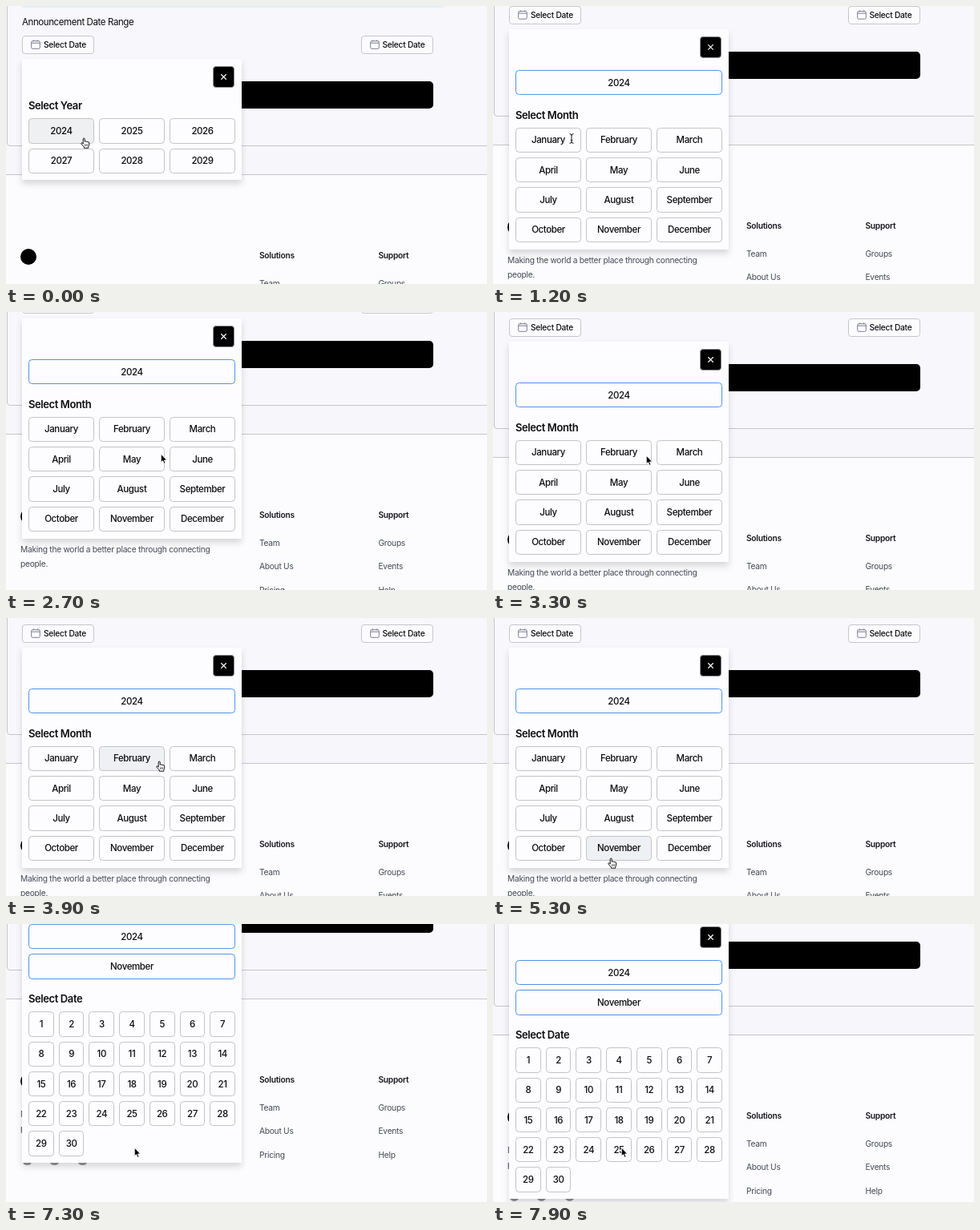
An HTML page that plays this animation: 600x347 px, repeating every 8 s.

```html
<!DOCTYPE html>
<html lang="en">
<head>
<meta charset="utf-8">
<title>Date range picker</title>
<style>
html, body { margin: 0; width: 100%; height: 100%; overflow: hidden; }
body { position: relative; background: #fcfbfe; color: #0c0c0f; font: 11.5px/16px Inter, Roboto, sans-serif; letter-spacing: -.035em; }
div, svg { box-sizing: border-box; }
#stage { position: absolute; left: 0; top: 0; width: 600px; height: 347px; overflow: hidden; }
#page { position: absolute; left: 0; top: 0; width: 600px; height: 600px; animation: scroll 8s linear infinite; }
#page > *, .view > * { position: absolute; }

.section { left: 0; top: 0; width: 600px; height: 211px; background: #f7f6fa; border-bottom: 1px solid #c6c5cc; }
.panel { left: 1px; top: -20px; width: 640px; height: 195px; background: #f8f7fb; border: 1px solid #c6c5cc; border-radius: 4px; }
.band { left: 20px; top: 0; width: 527px; height: 2px; background: #e2effc; }
.bar { left: 20px; top: 94px; width: 513px; height: 34px; border-radius: 5px; background: #000; }
.pick { top: 37px; width: 90px; height: 22.5px; padding-left: 10px; display: flex; align-items: center; gap: 4px;
  border: 1px solid #c6c6cd; border-radius: 4px; background: #fcfbfe; font-size: 10.2px; font-weight: 500; letter-spacing: -.025em; }
.note { white-space: nowrap; font-size: 10.2px; letter-spacing: -.025em; color: #434955; transform: translateY(-50%); }
.note.head { font-weight: 600; color: #15171c; }
.dot { border-radius: 50%; }

.view { left: 20px; top: 66px; width: 274px; background: #fdfcfe; box-shadow: 0 5px 8px rgba(0, 0, 0, .15); visibility: hidden; }
.close { left: 238px; top: 9px; width: 27px; height: 27px; border: 1px solid #8d8d92; border-radius: 4px; background: #000; }
.title { left: 8px; font-size: 13px; font-weight: 600; white-space: nowrap; transform: translateY(-50%); }
.grid { left: 8px; width: 258px; display: grid; gap: 6px; grid-auto-rows: 31.3px; }
.cell { display: flex; align-items: center; justify-content: center; border: 1px solid #c3c3ca; border-radius: 4.5px; font-weight: 450; }
.chosen .cell { border: 1.5px solid #4f93e6; }

#years { height: 151px; animation: years 8s step-end infinite; }
#months { height: 275px; animation: months 8s step-end infinite; }
#dates { height: 349px; animation: dates 8s step-end infinite; }

#cursor { position: absolute; left: 0; top: 0; animation: move 8s linear infinite; }
#cursor svg { position: absolute; overflow: visible; visibility: hidden; }
#hand { animation: hand 8s step-end infinite; }
#beam { animation: beam 8s step-end infinite; }
#arrow { animation: arrow 8s step-end infinite; }

@keyframes scroll {
  0%, 12.5% { transform: translateY(0); }
  15% { transform: translateY(-37px); }
  18.75%, 23.75% { transform: translateY(-62px); }
  27.5% { transform: translateY(-70px); }
  33.75%, 35% { transform: translateY(-58px); }
  41.25%, 80% { transform: translateY(-29px); }
  83.75%, 91.25% { transform: translateY(-117px); }
  98.75%, 100% { transform: translateY(-72px); }
}
@keyframes move {
  0%, 23.75% { transform: translate(97px, 165px); }
  32.5%, 36.25% { transform: translate(193px, 177px); }
  41.25%, 52.5% { transform: translate(191px, 179px); }
  63.75%, 71.25% { transform: translate(147px, 300px); }
  75%, 87.5% { transform: translate(160px, 281px); }
  91.25%, 100% { transform: translate(160px, 279px); }
}
@keyframes years { 0% { visibility: visible; } 5%, 100% { visibility: hidden; } }
@keyframes months { 0% { visibility: hidden; } 5% { visibility: visible; } 71.25%, 100% { visibility: hidden; } }
@keyframes dates { 0% { visibility: hidden; } 71.25%, 100% { visibility: visible; } }
@keyframes hand {
  0% { visibility: visible; } 5% { visibility: hidden; }
  42.5% { visibility: visible; } 90%, 100% { visibility: hidden; }
}
@keyframes beam { 0% { visibility: hidden; } 5% { visibility: visible; } 23.75%, 100% { visibility: hidden; } }
@keyframes arrow {
  0% { visibility: hidden; } 23.75% { visibility: visible; }
  42.5% { visibility: hidden; } 90%, 100% { visibility: visible; }
}
/* Hovered buttons */
@keyframes over-2024 { 0% { background: #eef0f2; } 5%, 100% { background: none; } }
@keyframes over-February { 0% { background: none; } 42.5% { background: #eef0f3; } 53.5%, 100% { background: none; } }
@keyframes over-May { 0% { background: none; } 54% { background: #eef0f3; } 57%, 100% { background: none; } }
@keyframes over-August { 0% { background: none; } 57.5% { background: #eef0f3; } 60.5%, 100% { background: none; } }
@keyframes over-November { 0% { background: none; } 61% { background: #eef0f3; } 71.25%, 100% { background: none; } }
@keyframes over-18 { 0% { background: none; } 73.75% { background: #e7e7ec; } 90%, 100% { background: none; } }
</style>
</head>
<body>
<div id="stage">
  <div id="page">
    <div class="section"></div>
    <div class="panel"></div>
    <div class="band"></div>
    <div style="left:20px; top:12px">Announcement Date Range</div>
    <div class="bar"></div>
  </div>
  <div id="cursor">
    <svg id="hand" width="12" height="14" style="left:-4px; top:-1px" viewBox="0 0 12 14">
      <path d="M3.2 8.2V2a1 1 0 0 1 2 0v3.2q1-.8 1.9.2 1-.6 1.8.3 1.6-.5 1.8 1.1v2.4q0 1.2-1 2.6v1.4H4.4v-1.2L1 8.2q-.6-1.2.5-1.5.7-.1 1.7 1.5z" fill="#fff" stroke="#111" stroke-width="1" stroke-linejoin="round"/>
      <path d="M5.6 8.4v2.4M7.2 8.4v2.4M8.8 8.4v2.4" stroke="#111" stroke-width=".7"/>
    </svg>
    <svg id="beam" width="6" height="13" style="left:-2px; top:-6px" viewBox="0 0 6 13">
      <path d="M.5.7Q3 .7 3 2.3 3 .7 5.5.7M3 2v9M.5 12.3Q3 12.3 3 10.7q0 1.6 2.5 1.6M1.8 8.5h2.4" fill="none" stroke="#111"/>
    </svg>
    <svg id="arrow" width="9" height="14" viewBox="0 0 9 14">
      <path d="M.3.3v10.4l2.3-2.1 1.5 3.7 1.8-.8-1.5-3.5h3.2z" fill="#000" stroke="#fff" stroke-width=".8"/>
    </svg>
  </div>
</div>
<script>
const page = document.getElementById('page');
const add = html => page.insertAdjacentHTML('beforeend', html);

const calendar = `<svg width="12" height="12" viewBox="0 0 12 12" fill="none" stroke="#7c7d96">
  <rect x=".7" y="1.7" width="10.6" height="9.6" rx="1.5"/><path d="M.7 4.2h10.6M3.3.3v2M8.7.3v2"/></svg>`;
for (const x of [20, 442.5]) add(`<div class="pick" style="left:${x}px">${calendar}Select Date</div>`);

const note = (x, y, text, kind = '') =>
  add(`<div class="note ${kind}" style="left:${x}px; top:${y}px">${text}</div>`);
const dot = (x, y, r, color) =>
  add(`<div class="dot" style="left:${x - r}px; top:${y - r}px; width:${2 * r}px; height:${2 * r}px; background:${color}"></div>`);

dot(28, 313, 10, '#000');
note(18, 354, 'Making the world a better place through connecting');
note(18, 371.5, 'people.');
for (const x of [26, 60, 95]) dot(x, 411, 6.5, '#8b8d96');

const columns = [[316, 'Solutions', 'Team', 'About Us', 'Pricing'], [464.5, 'Support', 'Groups', 'Events', 'Help']];
for (const [x, head, ...links] of columns) {
  note(x, 311, head, 'head');
  links.forEach((text, i) => note(x, 346 + 29.4 * i, text));
}

const hovers = { years: ['2024'], months: ['February', 'May', 'August', 'November'], dates: ['18'] };
const cell = (text, id) => {
  const lit = hovers[id].includes(text) ? ` style="animation:over-${text} 8s step-end infinite"` : '';
  return `<div class="cell"${lit}>${text}</div>`;
};
const grid = (top, cols, cells, kind = '') =>
  `<div class="grid ${kind}" style="top:${top}px; grid-template-columns:repeat(${cols},1fr)">${cells.join('')}</div>`;

function view(id, title, titleY, cols, items, chosen = []) {
  add(`<div class="view" id="${id}">
    <svg class="close" viewBox="0 0 27 27"><path d="M10 10l7 7m0-7l-7 7" stroke="#fff" stroke-width="1.2"/></svg>
    ${grid(51, 1, chosen.map(text => `<div class="cell">${text}</div>`), 'chosen')}
    <div class="title" style="top:${titleY}px">${title}</div>
    ${grid(titleY + 16.3, cols, items.map(text => cell(text, id)))}
  </div>`);
}

const count = (n, from) => Array.from({ length: n }, (_, i) => String(from + i));
const months = 'January February March April May June July August September October November December'.split(' ');
view('years', 'Select Year', 58, 3, count(6, 2024));
view('months', 'Select Month', 106.5, 3, months, ['2024']);
view('dates', 'Select Date', 144, 7, count(30, 1), ['2024', 'November']);
</script>
</body>
</html>
```
